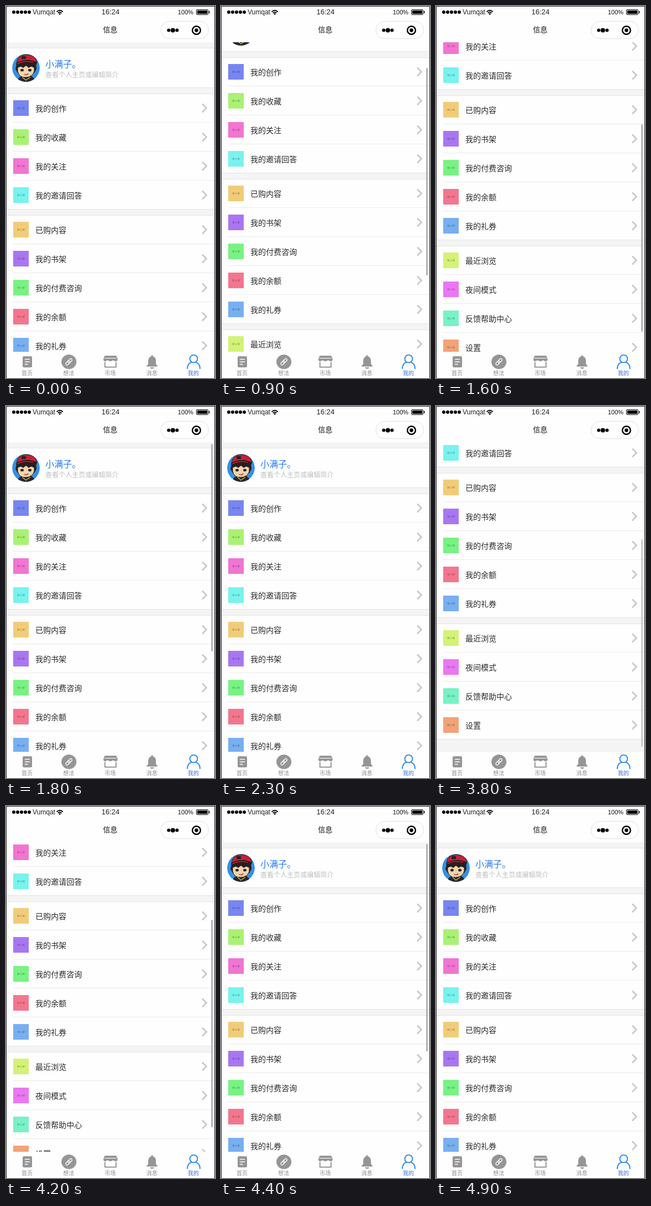
An HTML page that plays this animation: 377x667 px, repeating every 5.9 s.

```html
<!DOCTYPE html>
<html lang="zh-CN">
<head>
<meta charset="utf-8">
<style>
html, body { margin: 0; width: 100%; height: 100%; overflow: hidden; background: #fff; }
svg { display: block; font-family: "Noto Sans CJK SC", "Noto Sans CJK", sans-serif; }
.latin { font-family: "Liberation Sans", Arial, sans-serif; }
.mid { text-anchor: middle; }
.tiny { font-size: 4.5px; font-weight: bold; fill: #000; opacity: .3; }
.line { fill: none; stroke-linecap: round; stroke-linejoin: round; }
</style>
</head>
<body>
<svg width="377" height="667" viewBox="0 0 377 667">
  <clipPath id="view"><path d="M1 65H376V620H1z"/></clipPath>
  <clipPath id="face"><circle cx="36" cy="111" r="25"/></clipPath>
  <rect width="377" height="667" fill="#fefefe"/>

  <g clip-path="url(#view)">
    <g id="page">
      <path fill="#f4f4f4" d="M1 65H376V875H1z"/>
      <g id="cards"></g>
      <g clip-path="url(#face)">
        <circle cx="36" cy="111" r="25" fill="#3490e6"/>
        <path fill="#25201f" d="M20 101H54L55 113 51 120H21L17 113z"/>
        <path fill="#28262b" d="M20 137Q22 127 29 125H44Q51 127 53 137z"/>
        <path fill="#f4d2ab" stroke="#25201f" d="M21 110Q36 103 51 110V117Q48 127 36 128T21 117z"/>
        <path fill="#25201f" d="M21 111L24 104H49L51 111 46 108 41 111 36 107 31 111 26 108z"/>
        <path fill="#c81f38" stroke="#25201f" d="M19 102Q21 87 37 87T56 101Q38 95 19 102z"/>
        <path fill="#25201f" d="M18 103Q34 93 50 99L56 101 55 105Q38 100 19 107z"/>
        <path class="line" stroke="#c81f38" stroke-width="1.500" d="M21 103.500Q34 97 48 101"/>
        <rect x="28" y="90" width="8" height="5" rx="1" fill="#25201f"/>
        <ellipse cx="29" cy="115" rx="3" ry="2.300" fill="#222"/><ellipse cx="43" cy="115" rx="3" ry="2.300" fill="#222"/>
        <path class="line" stroke="#7c3b2c" stroke-width="1.300" d="M33 122.500Q37 125 40 121.500"/>
        <path class="line" stroke="#d9b54a" stroke-width="1.500" d="M30 128L36 133 43 128"/>
      </g>
      <text x="71" y="110" font-size="16" fill="#2478f5">小满子。</text>
      <text x="71" y="127.500" font-size="12" fill="#bebebe">查看个人主页或编辑简介</text>
    </g>
    <rect id="bar" x="370" width="3" height="372" rx="1.5" fill="#b4b4b4"/>
  </g>

  <g id="status">
    <path class="line" stroke="#000" stroke-width="6" stroke-dasharray="0 7" d="M14 11H43"/>
    <text class="latin" x="48" y="15" font-size="12" fill="#222">Vumqat</text>
    <g class="line" stroke="#000" stroke-width="1.8">
      <path d="M92 10Q97 5.500 102 10M94.300 12.300Q97 10 99.700 12.300"/>
      <circle cx="97" cy="14.300" r=".6"/>
    </g>
    <text class="latin mid" x="188.500" y="15" font-size="13" fill="#222">16:24</text>
    <text class="latin" x="310" y="15" font-size="11" fill="#111">100%</text>
    <rect x="343.500" y="6.500" width="21" height="9" rx="1.5" fill="none" stroke="#000"/>
    <path d="M345 8H363V14H345zM366 9H367.500V13H366z"/>
    <text class="mid" x="188" y="47" font-size="13" fill="#111">信息</text>
    <rect x="279.500" y="27.500" width="86" height="31" rx="15.500" fill="#fff" stroke="#e0e0e0"/>
    <circle cx="293.500" cy="43.500" r="3"/><circle cx="301" cy="43.500" r="4"/><circle cx="308.500" cy="43.500" r="3"/>
    <circle cx="343.500" cy="43.500" r="7.300" fill="none" stroke="#000" stroke-width="2.500"/>
    <circle cx="343.500" cy="43.500" r="3.300"/>
  </g>

  <g id="tabs" fill="#959595">
    <rect x="30" y="628" width="17" height="20" rx="2.500"/>
    <path class="line" stroke="#fff" stroke-width="1.500" d="M34.500 633.500H42.500M34.500 638H42.500M34.500 642.500H39"/>
    <ellipse cx="113.500" cy="638" rx="13.500" ry="13"/>
    <g class="line" stroke="#fff" stroke-width="1.300" transform="translate(113.500 638) rotate(-45)">
      <rect x="-7" y="-2.300" width="8.500" height="4.600" rx="2.300"/>
      <rect x="-1.500" y="-2.300" width="8.500" height="4.600" rx="2.300"/>
    </g>
    <path d="M178 627H199L201.500 633.500Q201 637 198 637T193.500 635Q191 637 188.500 637T183 635Q181 637 178.500 637T175.500 633.500z"/>
    <path class="line" stroke="#959595" stroke-width="2" d="M178.500 639V647.500H198.500V639"/>
    <path class="line" stroke="#fff" d="M178 631.500H199"/>
    <path d="M263.500 626Q265 626 265 628Q270.500 630 270.500 637V642L273.500 645.500V646.500H253.500V645.500L256.500 642V637Q256.500 630 262 628Q262 626 263.500 626zM259.500 648H267.500Q266 650.500 263.500 650.500T259.500 648z"/>
    <g class="line" stroke="#2a86ea" stroke-width="1.900">
      <circle cx="338.500" cy="632.500" r="6.900"/>
      <path d="M327 650Q327.500 641 334.500 638.700M342.500 638.700Q349.500 641 350 650"/>
    </g>
  </g>
  <path fill="none" stroke="#222" d="M.5 667V.5H376.500V667"/>
</svg>
<script>
const LOOP = 5900, MAX_SCROLL = 255, TOP = 65;
const $ = id => document.getElementById(id);

// Each group: top edge, then its rows as [label, icon colour]
const groups = [
  [157, [['我的创作', '#7786f0'], ['我的收藏', '#aaf174'], ['我的关注', '#f275d1'], ['我的邀请回答', '#78f3ee']]],
  [375, [['已购内容', '#f1cc78'], ['我的书架', '#a976f1'], ['我的付费咨询', '#79f284'], ['我的余额', '#f3768f'], ['我的礼券', '#78aff1']]],
  [645, [['最近浏览', '#d4f276'], ['夜间模式', '#ea78f2'], ['反馈帮助中心', '#78f2c6'], ['设置', '#f2a378']]]
];

const card = (y, h) => `<path fill="#fefefe" d="M1 ${y}h375v${h}h-375z"/>
  <path fill="none" stroke="#e4e4e4" d="M1 ${y + .5}h375M1 ${y + h - .5}h375"/>`;

const row = ([label, color], y, isFirst) => `
  ${isFirst ? '' : `<path stroke="#ebebeb" d="M13 ${y - .5}H376"/>`}
  <rect x="13" y="${y + 12}" width="28" height="28" fill="${color}"/>
  <text class="latin mid tiny" x="27" y="${y + 28}">W x W</text>
  <text x="53" y="${y + 32}" font-size="14" fill="#2a2a2a">${label}</text>
  <path fill="none" stroke="#c8c8cc" stroke-width="2.6" d="M354 ${y + 18.5}l7.500 7.500l-7.500 7.500"/>`;

$('cards').innerHTML = card(75, 72) + groups.map(([top, rows]) =>
  card(top, rows.length * 52) + rows.map((r, i) => row(r, top + i * 52, i === 0)).join('')).join('');

$('tabs').innerHTML += ['首页', '想法', '市场', '消息', '我的'].map((name, i) =>
  `<text class="mid" x="${38 + i * 75}" y="662" font-size="10" fill="${i === 4 ? '#3a72e8' : '#8c8c8c'}">${name}</text>`).join('');

// Swipes between both ends of the list; the scrollbar fades out afterwards
const swipes = [
  { start: 849.5, length: 150, from: 0, to: MAX_SCROLL, fade: 1400 },
  { start: 1548, length: 200, from: MAX_SCROLL, to: 0, fade: 2100 },
  { start: 3239, length: 200, from: 0, to: MAX_SCROLL, fade: 3800 },
  { start: 4141, length: 200, from: MAX_SCROLL, to: 0, fade: 4700 }
];
const clamp = x => Math.min(1, Math.max(0, x));
const ease = x => (1 - Math.cos(Math.PI * clamp(x))) / 2;

function draw(now) {
  const t = Math.floor(now % LOOP / 100) * 100;
  const swipe = swipes.filter(s => s.start <= t).pop();
  let scroll = 0, opacity = 0;
  if (swipe) {
    const { start, length, from, to, fade } = swipe;
    scroll = Math.round(from + (to - from) * ease((t - start) / length));
    opacity = clamp(1 - (t - fade + 100) / 300);
  }
  $('page').setAttribute('transform', `translate(0 ${-scroll})`);
  $('bar').setAttribute('y', Math.floor(TOP + 3 + scroll * 171 / MAX_SCROLL));
  $('bar').setAttribute('opacity', opacity);
}

const begin = performance.now();
function tick() {
  draw(performance.now() - begin);
  requestAnimationFrame(tick);
}
tick();
</script>
</body>
</html>
```
